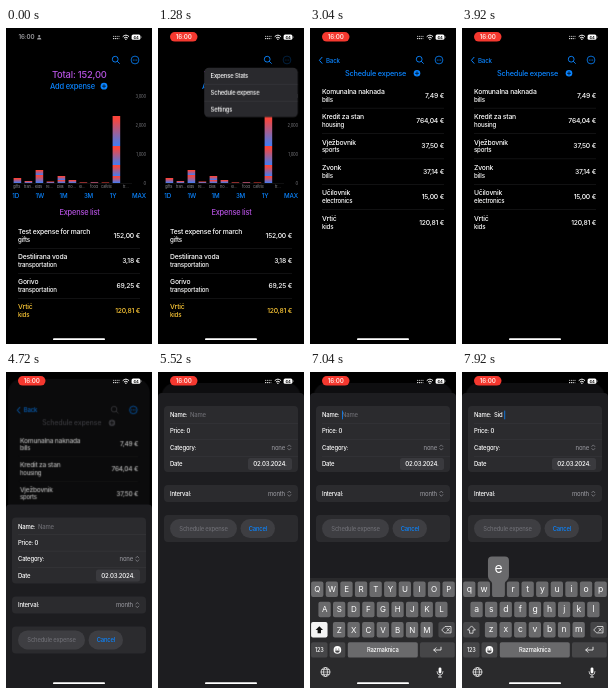
Write an HTML page that moves like this. It is 146 px wide and 316 px high and loops after 8000 ms.

```html
<!DOCTYPE html>
<html lang="hr">
<head>
<meta charset="utf-8">
<title>Expense tracker</title>
<style>
html, body { margin: 0; width: 100%; height: 100%; overflow: hidden; background: #000; }
svg { display: block; width: 146px; height: 316px; font-family: Inter, Roboto, sans-serif; letter-spacing: -0.012em; }
text { white-space: pre; }
</style>
</head>
<body>
<svg id="stage" viewBox="0 0 146 316"></svg>
<script>
const LOOP = 8000;
const BLUE = '#0a84ff', PURPLE = '#b552e0', WHITE = '#fff', GRAY = '#8e8e94', DIM = '#4c4c52';
const KEY = '#6a6a6c', DARK_KEY = '#464648';
const stage = document.getElementById('stage');

// ---------- drawing helpers ----------
function add(parent, tag, attrs = {}) {
  const el = document.createElementNS('http://www.w3.org/2000/svg', tag);
  for (const k in attrs) el.setAttribute(k, attrs[k]);
  parent.appendChild(el);
  return el;
}
const group = parent => add(parent, 'g');
const rect = (p, x, y, width, height, fill, rx = 0) => add(p, 'rect', { x, y, width, height, fill, rx });
const line = (p, d, stroke, w = 0.8) => add(p, 'path', {
  d, stroke, 'stroke-width': w, fill: 'none', 'stroke-linecap': 'round', 'stroke-linejoin': 'round'
});
const circle = (p, cx, cy, r, attrs) => add(p, 'circle', { cx, cy, r, ...attrs });
function label(p, s, x, cy, size, fill = WHITE, anchor = 'start', weight = 500) {
  const el = add(p, 'text', {
    x, y: cy + size * 0.36, fill, 'font-size': size, 'text-anchor': anchor, 'font-weight': weight
  });
  el.textContent = s;
  return el;
}

// ---------- motion helpers: steps are [ms, value] ----------
function play(el, prop, steps, format = v => v, hard = false) {
  const all = [[0, steps[0][1]], ...steps.filter(s => s[0] > 0), [LOOP, steps[steps.length - 1][1]]];
  const frames = all.map(([t, v]) => ({
    offset: t / LOOP, [prop]: format(v), easing: hard ? 'steps(1, end)' : 'linear'
  }));
  el.animate(frames, { duration: LOOP, iterations: Infinity });
}
const show = (el, from, to = LOOP) =>
  play(el, 'opacity', [[0, from > 0 ? 0 : 1], [from, 1], ...(to < LOOP ? [[to, 0]] : [])], v => v, true);
const slideY = v => `translate(0px, ${v}px)`;

// ---------- shared parts ----------
function searchIcon(p, color = BLUE) {
  circle(p, 109.2, 31.2, 2.9, { fill: 'none', stroke: color, 'stroke-width': 0.9 });
  line(p, 'M111.4 33.4 L113.4 35.4', color, 0.9);
}
function moreIcon(p) {
  const g = group(p);
  circle(g, 129, 32, 3.9, { fill: 'none', stroke: BLUE, 'stroke-width': 0.8 });
  [-1.7, 0, 1.7].forEach(d => circle(g, 129 + d, 32, 0.55, { fill: BLUE }));
  return g;
}
function plusIcon(p, x, y, r, color = BLUE) {
  circle(p, x, y, r, { fill: color });
  line(p, `M${x - 1.6} ${y} h3.2 M${x} ${y - 1.6} v3.2`, '#000', 0.7);
}
function expenses(p, rows, top, pitch) {
  rows.forEach(([name, kind, price, color = WHITE], i) => {
    const y = top + i * pitch;
    label(p, name, 12, y, 6.8, color);
    label(p, kind, 12, y + 8, 6.15, color);
    label(p, price, 134, y + 3.8, 6.75, color, 'end');
    if (i < rows.length - 1) rect(p, 12, y + 16.6, 122, 0.4, '#2c2c2e');
  });
}

rect(stage, 0, 0, 146, 316, '#000');

// ---------- overview ----------
const home = group(stage);
searchIcon(home);
const more = moreIcon(home);
label(home, 'Total: 152,00', 73.3, 46.6, 9.4, PURPLE, 'middle');
label(home, 'Add expense', 44, 58.2, 7.5, BLUE);
plusIcon(home, 98, 58.2, 3.4);

const grad = add(add(stage, 'defs'), 'linearGradient', { id: 'bar', x1: 0, y1: 0, x2: 0, y2: 1 });
add(grad, 'stop', { offset: 0.1, 'stop-color': '#fa453c' });
add(grad, 'stop', { offset: 1, 'stop-color': '#3f7df5' });

[3, 2, 1, 0].forEach((n, i) =>
  label(home, n ? n + ',000' : '0', 140, 68 + i * 29, 4.2, '#77777c', 'end', 400));
// each bar is a stack of expenses
[[5], [2], [5, 8], [1.5], [4, 3], [3], [0.6], [0.8], [0.5], [30, 19, 11, 7]].forEach((stack, i) => {
  let y = 155;
  [...stack].reverse().forEach(h => rect(home, 7.6 + i * 11, y -= h, 7.6, h, 'url(#bar)'));
});
rect(home, 7, 155, 119, 0.3, '#333336');
['gifts', 'tran…', 'kids', 're…', 'bills', 'ho…', 'el…', 'food', 'cafete', '', 'tr…'].forEach((s, i) =>
  label(home, s, 7 + i * 11, 158.5, 4, '#85858a', 'start', 400));
[['1D', 9.6], ['1W', 33.7], ['1M', 57.5], ['3M', 82.5], ['1Y', 107], ['MAX', 133]].forEach(([s, x]) =>
  label(home, s, x, 168, 6.2, BLUE, 'middle'));

label(home, 'Expense list', 73.5, 184.3, 7.4, PURPLE, 'middle');
expenses(home, [
  ['Test expense for march', 'gifts', '152,00 €'],
  ['Destilirana voda', 'transportation', '3,18 €'],
  ['Gorivo', 'transportation', '69,25 €'],
  ['Vrtić', 'kids', '120,81 €', '#fcc735']
], 203.7, 24.9);

// ---------- popup menu ----------
const menu = group(stage);
rect(menu, 46.2, 39.8, 93.6, 49.4, '#29292d', 4.5);
['Expense Stats', 'Schedule expense', 'Settings'].forEach((s, i) => {
  label(menu, s, 52.5, 48.2 + i * 16.5, 5.9);
  if (i) rect(menu, 46.2, 40 + i * 16.5, 93.6, 0.4, '#414146');
});

// ---------- scheduled list ----------
const plan = group(stage);
rect(plan, 0, 0, 146, 316, '#000');
const card = rect(plan, 0, 0, 146, 316, '#18181b', 14);
line(plan, 'M12 29.3 L9.4 32.3 L12 35.3', BLUE, 1);
label(plan, 'Back', 16, 32.3, 6.2, BLUE);
moreIcon(plan);
const [planTint, planGray] = [BLUE, DIM].map(color => {
  const g = group(plan);
  searchIcon(g, color);
  label(g, 'Schedule expense', 35, 45.3, 7.3, color);
  plusIcon(g, 107, 45.3, 3.3, color);
  return g;
});
expenses(plan, [
  ['Komunalna naknada', 'bills', '7,49 €'],
  ['Kredit za stan', 'housing', '764,04 €'],
  ['Vježbovnik', 'sports', '37,50 €'],
  ['Zvonk', 'bills', '37,14 €'],
  ['Učilovnik', 'electronics', '15,00 €'],
  ['Vrtić', 'kids', '120,81 €']
], 63.3, 25.4);

// ---------- form sheet ----------
const sheet = group(stage);
rect(sheet, 0, 21, 146, 320, '#1d1d20', 4);
[[34, 66], [113, 17], [143, 27]].forEach(([y, h]) => rect(sheet, 6, y, 134, h, '#2b2b2e', 4));
[51, 67.5, 84].forEach(y => rect(sheet, 12, y, 128, 0.4, '#3c3c40'));
[['Name:', 43], ['Price: 0', 59.3], ['Category:', 75.5], ['Date', 92], ['Interval:', 121.7]].forEach(([s, y]) =>
  label(sheet, s, 12, y, 5.95));
[['none', 75.5], ['month', 121.7]].forEach(([s, y]) => {
  label(sheet, s, 127, y, 5.95, GRAY, 'end');
  line(sheet, `M129.8 ${y - 1} l1.5 -1.6 l1.5 1.6 M129.8 ${y + 1} l1.5 1.6 l1.5 -1.6`, GRAY, 0.7);
});
rect(sheet, 90, 86, 44, 12, '#3a3a3e', 2.5);
label(sheet, '02.03.2024.', 112, 92, 6.05, WHITE, 'middle');
rect(sheet, 12, 147, 67, 19, '#3e3e42', 9.5);
label(sheet, 'Schedule expense', 45.5, 156.7, 5.85, '#6c6c72', 'middle');
rect(sheet, 82.5, 147, 34.5, 19, '#3e3e42', 9.5);
label(sheet, 'Cancel', 99.8, 156.7, 5.85, BLUE, 'middle');
const hint = label(sheet, 'Name', 32, 43, 5.95, '#6c6c72');
const typed = ['S', 'Si', 'Sid'].map(s => label(sheet, s, 32, 43, 5.95));
const caret = rect(sheet, 32, 38.4, 0.8, 9, BLUE, 0.4);

// ---------- keyboard ----------
const board = group(stage);
rect(board, 0, 206, 146, 130, '#2a2a2c');
const keys = group(board), upper = group(board), lower = group(board);
const keyAt = {};
[['qwertyuiop', 1.1, 209.5], ['asdfghjkl', 8.4, 229.8], ['zxcvbnm', 22.9, 250]].forEach(([row, x0, y]) =>
  [...row].forEach((c, i) => {
    const x = x0 + i * 14.6;
    keyAt[c] = [x + 6.15, y];
    rect(keys, x, y, 12.3, 15.4, KEY, 1.9);
    label(upper, c.toUpperCase(), x + 6.15, y + 7.7, 8, WHITE, 'middle', 400);
    label(lower, c, x + 6.15, y + 7, 8.6, WHITE, 'middle', 400);
  }));
[[1.1, 250, 16.4], [128.4, 250, 16.4], [1.1, 270.2, 16.4], [19.5, 270.2, 15.8], [110, 270.2, 34.8]].forEach(([x, y, w]) =>
  rect(keys, x, y, w, 15.4, DARK_KEY, 1.9));
rect(keys, 37.8, 270.2, 70, 15.4, KEY, 1.9);
const arrow = 'M9.3 254.2 L5.6 258 H7.6 V261.2 H11 V258 H13 Z';
rect(upper, 1.1, 250, 16.4, 15.4, '#f4f4f4', 1.9);
add(upper, 'path', { d: arrow, fill: '#111' });
line(lower, arrow, WHITE, 0.7);
line(board, 'M132 257.7 l3 -3.2 h6 v6.4 h-6 Z M136.8 256.2 l2.8 3 m0 -3 l-2.8 3', WHITE, 0.7);
label(board, '123', 9.3, 278, 5.6, WHITE, 'middle');
circle(board, 27.4, 277.9, 3.8, { fill: WHITE });
circle(board, 26, 277, 0.6, { fill: DARK_KEY });
circle(board, 28.8, 277, 0.6, { fill: DARK_KEY });
add(board, 'path', { d: 'M25 278.6 h4.8 a2.4 2.2 0 0 1 -4.8 0 Z', fill: DARK_KEY });
label(board, 'Razmaknica', 72.8, 278, 5.8, WHITE, 'middle');
line(board, 'M131 275.2 v2.8 h-7.2 m2.2 -2.2 l-2.2 2.2 l2.2 2.2', WHITE, 0.8);
circle(board, 15.5, 300, 4.4, { fill: 'none', stroke: WHITE, 'stroke-width': 0.8 });
add(board, 'ellipse', { cx: 15.5, cy: 300, rx: 2, ry: 4.4, fill: 'none', stroke: WHITE, 'stroke-width': 0.7 });
line(board, 'M11.1 300 h8.8 M12 297.6 h7 M12 302.4 h7', WHITE, 0.6);
rect(board, 128.6, 295.4, 2.8, 6, WHITE, 1.4);
line(board, 'M127 299.6 a3 3.4 0 0 0 6 0 M130 303.2 v1.8 m-1.6 0 h3.2', WHITE, 0.7);

function popup(c, from, to, text = c) {
  const [x, y] = keyAt[c], g = group(board);
  add(g, 'path', {
    fill: KEY,
    d: `M${x - 6.2} ${y + 13.5} V${y + 3} C${x - 6.2} ${y - 1} ${x - 10.5} ${y - 1} ${x - 10.5} ${y - 6}
        V${y - 21} q0 -4 4 -4 h13 q4 0 4 4 V${y - 6} C${x + 10.5} ${y - 1} ${x + 6.2} ${y - 1} ${x + 6.2} ${y + 3}
        V${y + 13.5} q0 1.9 -1.9 1.9 h-8.6 q-1.9 0 -1.9 -1.9 Z`
  });
  label(g, text, x, y - 13.5, 14, WHITE, 'middle', 400);
  show(g, from, to);
}
popup('s', 7120, 7200, 'S');
popup('i', 7360, 7440);
popup('d', 7600, 7680);
popup('e', 7840, LOOP);

// ---------- status bar and home indicator ----------
const idle = group(stage);
label(idle, '16:00', 20.5, 9.2, 6.2, '#9a9a9e', 'middle', 600);
circle(idle, 33.2, 8, 1.1, { fill: '#9a9a9e' });
add(idle, 'path', { d: 'M31 11.6 a2.2 2.2 0 0 1 4.4 0 Z', fill: '#9a9a9e' });
const pill = group(stage);
rect(pill, 12, 4, 27.5, 9.6, '#f5382f', 4.8);
const clock = label(pill, '16:00', 25.7, 8.9, 6.2, '#ffe0da', 'middle', 600);
[0, 1, 2, 3].forEach(i => circle(stage, 107.6 + i * 1.8, 10.6, 0.65, { fill: i < 3 ? WHITE : '#777' }));
[0, 1, 2, 3].forEach(i => circle(stage, 107.6 + i * 1.8, 8.4, 0.6, { fill: '#aaa' }));
line(stage, 'M117 8.4 a4.2 4.2 0 0 1 5.8 0 M118.2 9.8 a2.4 2.4 0 0 1 3.4 0', WHITE, 1);
circle(stage, 119.9, 11.2, 0.7, { fill: WHITE });
rect(stage, 125.6, 6.6, 8.8, 5.2, WHITE, 1.5);
rect(stage, 134.7, 8.3, 0.7, 1.7, '#aaa', 0.3);
label(stage, '64', 130, 9.2, 4, '#111', 'middle', 700);
rect(stage, 47, 310.3, 52, 1.8, WHITE, 0.9);

// ---------- timing ----------
play(idle, 'opacity', [[0, 1], [80, 0.9], [320, 0]]);
play(pill, 'opacity', [[0, 0], [80, 0.1], [400, 1]]);
play(clock, 'opacity', [[1920, 1], [2240, 0.5], [2560, 1]]);

const menuSteps = [[800, 0], [880, 0.45], [960, 0.85], [1040, 1.01], [1200, 1], [2880, 1], [3040, 0]];
play(menu, 'opacity', menuSteps, v => Math.min(1, v));
play(menu, 'transform', menuSteps, v => {
  const k = 0.2 + 0.8 * v;
  return `translate(${128 * (1 - k)}px, ${36 * (1 - k)}px) scale(${k})`;
});
play(more, 'opacity', [[800, 1], [960, 0.3], [2880, 0.3], [3040, 1]]);
show(plan, 2960);
show(planTint, 0, 4400);
show(planGray, 4400);

const rise = [[0, 296], [4480, 296], [4560, 246], [4640, 175], [4720, 112], [4800, 63],
  [4880, 34], [4960, 17], [5040, 8], [5120, 3], [5280, 0]];
const risen = v => 1 - v / 296;
play(sheet, 'transform', rise, slideY);

// the list behind shrinks and dims as the sheet rises
const back = group(stage);
stage.insertBefore(back, sheet);
back.appendChild(plan);
play(back, 'transform', rise, v => {
  const p = risen(v), k = 1 - 0.048 * p;
  return `translate(${73 * (1 - k)}px, ${11 * p}px) scale(${k})`;
});
const shade = rect(back, -10, -20, 170, 350, '#000');
play(shade, 'opacity', rise, v => 0.42 * risen(v));
play(card, 'opacity', rise, risen);

play(board, 'transform', [[5760, 114], [5840, 92], [5920, 55], [6000, 27], [6080, 11], [6160, 3], [6240, 1], [6320, 0]], slideY);
show(upper, 0, 7200);
show(lower, 7200);

show(hint, 0, 7200);
const typing = [7200, 7440, 7680, LOOP];
typed.forEach((el, i) => show(el, typing[i], typing[i + 1]));
show(caret, 5760);
play(caret, 'transform', [[0, 0], [7200, 4.6], [7440, 6.1], [7680, 10.2]], v => `translate(${v}px, 0px)`, true);
</script>
</body>
</html>
```
